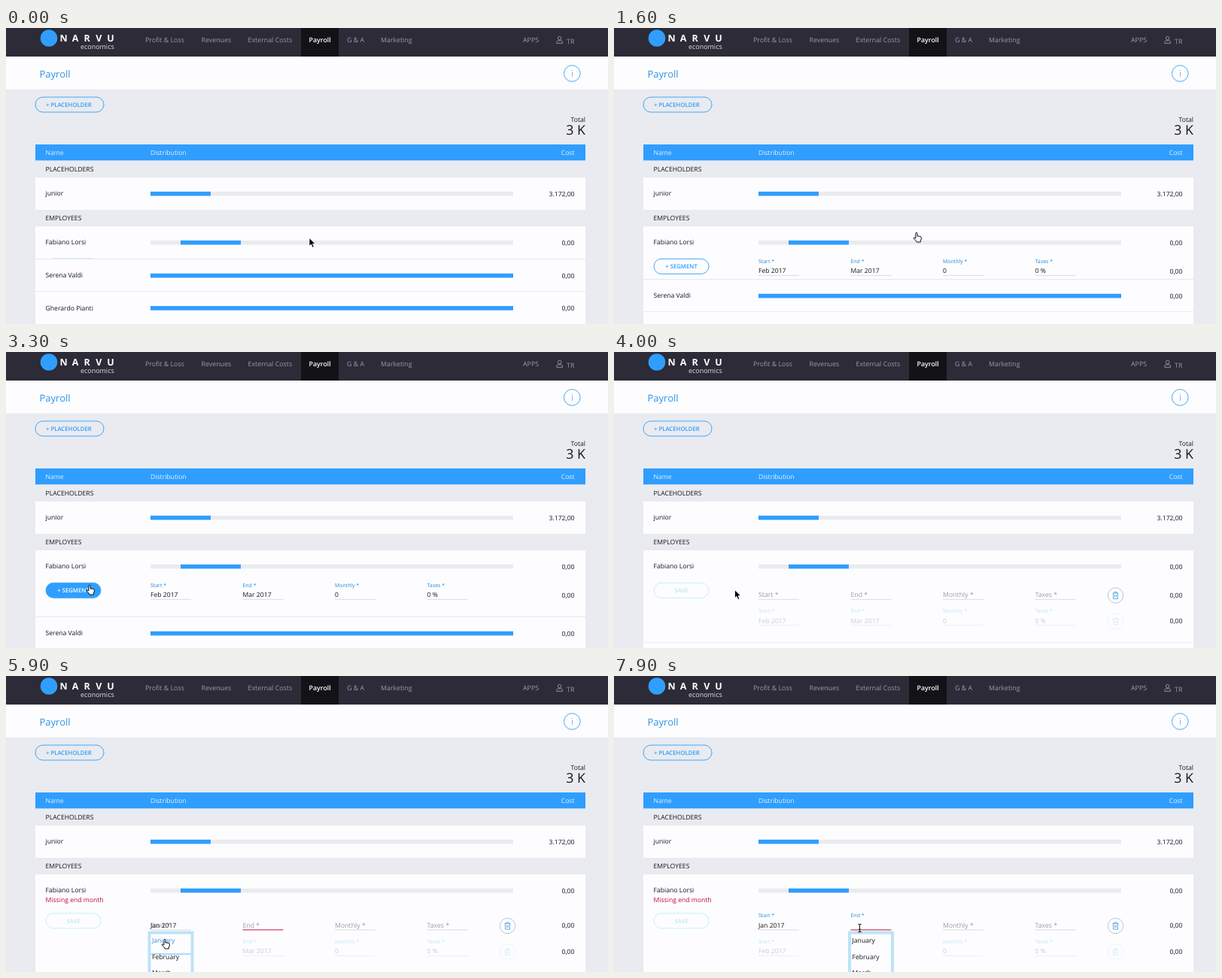
An HTML page that plays this animation: 800x394 px, repeating every 8 s.

```html
<!DOCTYPE html>
<html lang="en">
<head>
<meta charset="utf-8">
<title>Payroll</title>
<style>
  html, body { margin: 0; width: 100%; height: 100%; overflow: hidden; background: #e9ebf0; }
  svg { display: block; width: 800px; height: 394px; }
  text { font: 8.65px "Open Sans", "Noto Sans", sans-serif; fill: #17171b; text-rendering: geometricPrecision; white-space: pre; }
  .nav { font-size: 8.85px; fill: #9b9ba5; }
  .on { font-weight: 600; fill: #fff; }
  .head { fill: #e6f3ff; }
  .btn { font-size: 7.75px; font-weight: 600; fill: #2e9cfb; }
  .small { font-size: 6.95px; fill: #2687dc; }
  .hint { font-size: 8.75px; fill: #9a9da5; }
  .err { fill: #c00b3c; }
  .dim .small { fill: #c3e3f7; }
  .dim .val { fill: #c9ccd2; }
  .dim .rule { stroke: #eceef2; }
  .rule { stroke: #d9dbe1; }
  .end { text-anchor: end; }
  .mid { text-anchor: middle; }
</style>
</head>
<body>
<svg id="stage" viewBox="0 0 800 394"></svg>
<script>
const BLUE = '#2f9eff', WHITE = '#fdfdff', LINE = '#e5e7ec', RED = '#c3123f';
const COLS = [192, 314.5, 437, 559.5];
const LABELS = ['Start *', 'End *', 'Monthly *', 'Taxes *'];
const SEG = 34.5, ERR = 8.6, OPEN = 45;

const text = (x, y, s, cls = '', more = '') => `<text x="${x}" y="${y}" class="${cls}" ${more}>${s}</text>`;
const rect = (x, y, w, h, fill, more = '') => `<rect x="${x}" y="${y}" width="${w}" height="${h}" fill="${fill}" ${more}/>`;
const line = (x, y, w, more = '') => `<path d="M${x} ${y}h${w}" ${more}/>`;
const group = (id, body, more = '') => `<g id="${id}" ${more}>${body}</g>`;
const pill = (x, y, w, color, fill = 'none') =>
  rect(x, y, w, 20, fill, `rx="10" stroke="${color}"`);

// One table row: name, bar from a to b, cost.
const row = (y, name, a, b, cost) =>
  rect(39, y, 731, 43, WHITE) +
  text(52.5, y + 24.3, name) +
  rect(192, y + 18.8, 482, 5.6, '#e9ebef') +
  rect(a, y + 18.8, b - a, 5.6, BLUE) +
  text(755.5, y + 24.5, cost, 'end');

const trash = (x, y) => `<g transform="translate(${x} ${y})" fill="none">
  <circle r="10.2" stroke="#b4c6d3"/>
  <path d="M-4 -3h8M-1.5 -3v-1.6h3V-3M-3 -3v7.5h6V-3M-1 -1v3.6M1 -1v3.6" stroke="#3a9ee0" stroke-width=".8"/></g>`;

const oldFields = () => ['Feb 2017', 'Mar 2017', '0', '0 %'].map((v, i) =>
  text(COLS[i], 312.5, LABELS[i], 'small') +
  text(COLS[i], 326, v, 'val') +
  line(COLS[i], 329.3, 54, 'class="rule"')).join('');

const newFields = () => LABELS.map((s, i) =>
  text(0, 0, s, 'hint', `id="label${i}" transform="translate(${COLS[i]} 326)"`) +
  line(COLS[i], 329.3, 54, `class="rule" id="rule${i}"`)).join('');

const menu = () =>
  rect(-1.5, 0, 57, 90, WHITE, 'stroke="#bde3f7" stroke-width="4"') +
  line(.5, 28.5, 53, 'id="pick" stroke="#9ed6f7" stroke-width="1.6"') +
  ['January', 'February', 'March'].map((m, i) =>
    text(2, 13.6 + i * 21.4, m, '', `id="month${i}"`)).join('');

const header =
  rect(0, 0, 800, 38, '#2c2b37') + rect(392, 0, 50, 38, '#121217') +
  `<circle cx="57" cy="13.5" r="11.3" fill="${BLUE}"/>` +
  [...'NARVU'].map((c, i) => text(76.5 + i * 15.6, 17.6, c, 'on mid', 'style="font-size:12.5px;font-weight:700"')).join('') +
  text(99, 28, 'economics', '', 'style="font-size:8.95px;fill:#e2e2e7"') +
  [[185, 'Profit &amp; Loss'], [259.5, 'Revenues'], [321.5, 'External Costs'], [453, 'G &amp; A'],
   [498, 'Marketing'], [687, 'APPS']].map(([x, s]) => text(x, 19.4, s, 'nav')).join('') +
  text(402.5, 19.4, 'Payroll', 'nav on') + text(745, 20.6, 'TR', 'nav') +
  `<g fill="none" stroke="#9b9ba5" stroke-width=".9"><circle cx="735.7" cy="13.6" r="2.3"/>
   <path d="M731.8 20.3v-1.2q0-2 2-2.4h3.8q2 .4 2 2.4v1.2z"/></g>`;

const page =
  rect(0, 38, 800, 43.5, WHITE) +
  text(44.5, 65.6, 'Payroll', '', 'style="font-size:13px;fill:#2f93e6"') +
  `<circle cx="752.3" cy="60.5" r="10.8" fill="none" stroke="#4ba6ec"/>` +
  text(752.3, 65, 'i', 'mid', 'style="font-size:12.5px;font-weight:300;fill:#2f93e6"') +
  pill(39, 92, 91, '#44a6f5') + text(53, 104.8, '+ PLACEHOLDER', 'btn') +
  text(770, 125, 'Total', 'end') + text(770, 141.6, '3 K', 'end', 'style="font-size:17.8px"') +
  rect(39, 155, 731, 21.3, BLUE) +
  text(52.5, 168.6, 'Name', 'head') + text(192, 168.6, 'Distribution', 'head') +
  text(755.5, 168.6, 'Cost', 'head end') +
  text(52.5, 191.2, 'PLACEHOLDERS') + text(52.5, 256.2, 'EMPLOYEES') +
  row(199, 'junior', 192, 272, '3.172,00') +
  rect(39, 264, 731, 130, WHITE) +
  row(264, 'Fabiano Lorsi', 232, 312, '0,00');

const details =
  group('add', `<rect id="addBox" x="53" y="307.3" width="73" height="20" rx="10" stroke="#44a6f5"/>` +
    text(89.5, 320.2, '+ SEGMENT', 'btn mid', 'id="addText"')) +
  group('save', pill(53, 307.3, 73, '#c8f0e6') + text(89.5, 320.2, 'SAVE', 'btn mid', 'style="fill:#bcebdf"')) +
  group('old', oldFields() + text(755.5, 326.6, '0,00', 'end') + group('oldBin', trash(666.5, 324), 'opacity=".2"')) +
  group('fresh', newFields() + text(192, 326, 'Jan 2017', '', 'id="value"') +
    text(755.5, 326.6, '0,00', 'end') + trash(666.5, 324));

const below =
  rect(39, 307, 731, 120, WHITE) + rect(39, 307, 731, 1, LINE) +
  row(308, 'Serena Valdi', 192, 674, '0,00') + rect(39, 350.3, 731, 1, LINE) +
  row(351.3, 'Gherardo Pianti', 192, 674, '0,00');

const cursors = group('cursor',
  `<path id="arrow" d="M0 0v10.8l2.5-2.3 1.8 4.2 2-.9-1.8-4h3.4z" fill="#000" stroke="#fff" stroke-width=".8"/>
   <path id="hand" transform="translate(-4.3 0)" d="M3.2 8V1.6q0-1.2 1.1-1.2t1.1 1.2V5.2q1-.8 1.9.1 1-.5 1.7.3 1.5-.3 1.6 1V9l-1 2.2V13H4.6L3 10.5 .6 8.2q-.5-1.2.8-1.3z" fill="#fff" stroke="#000" stroke-width=".95"/>
   <path id="beam" d="M-2.3 -5.3q2.3 0 2.3 1.3q0-1.3 2.3-1.3M0 -4V4M-2.3 5.3q2.3 0 2.3-1.3q0 1.3 2.3 1.3M-1.3 1.5h2.6" fill="none" stroke="#222" stroke-width="1.1"/>`);

const stage = document.getElementById('stage');
stage.innerHTML = page + group('details', details) + text(52.5, 301.2, 'Missing end month', 'err', 'id="error"') +
  group('below', below) + header + rect(0, 0, 1, 11, '#17171b', 'id="caret"') + group('menu', menu()) + cursors;

const el = {};
stage.querySelectorAll('[id]').forEach(n => el[n.id] = n);

const ramp = (t, a, b) => Math.min(1, Math.max(0, (t - a) / (b - a)));
const ease = u => u * u * (3 - 2 * u);
const show = (n, on) => n.setAttribute('visibility', on ? 'inherit' : 'hidden');
const move = (n, x, y) => n.setAttribute('transform', `translate(${x} ${y})`);
const within = (t, a, b) => t >= a && t < b;

// Cursor stops: time, x, y.
const PATH = [[0, 403, 279.5], [800, 403, 279.5], [1200, 402, 272], [1900, 402, 272], [2800, 111, 310],
  [3700, 111, 310], [4300, 210, 323.5], [4900, 210, 323.5], [5400, 211, 342], [5700, 211, 350],
  [6100, 211, 350], [6500, 244, 344], [7100, 326.5, 335.5], [8000, 326.5, 335.5]];
const SHAPES = [[0, 'arrow'], [1000, 'hand'], [3700, 'arrow'], [4100, 'beam'], [5200, 'hand'], [7000, 'beam']];

function cursorAt(t) {
  const i = PATH.findIndex(p => p[0] > t), a = PATH[i - 1], b = PATH[i];
  const u = ease(ramp(t, a[0], b[0]));
  move(el.cursor, a[1] + (b[1] - a[1]) * u, a[2] + (b[2] - a[2]) * u);
  const shape = SHAPES.filter(s => s[0] <= t).pop()[1];
  for (const s of ['arrow', 'hand', 'beam']) show(el[s], s === shape);
}

// u = 0: hint inside the field; u = 1: small label above it.
function floatLabel(i, u) {
  const n = el['label' + i], mix = (a, b) => Math.round(a + (b - a) * u);
  n.setAttribute('transform', `translate(${COLS[i]} ${326 - 13.5 * u}) scale(${1 - .206 * u})`);
  n.style.fill = `rgb(${mix(154, 38)},${mix(157, 135)},${mix(165, 220)})`;
}

function draw(t) {
  const open = ramp(t, 1450, 1700), added = ease(ramp(t, 3400, 3600));
  const error = ease(ramp(t, 5600, 5800)), shift = ERR * error;
  const split = t >= 3500;

  move(el.below, 0, OPEN * open + SEG * added + shift);
  move(el.details, 0, shift);
  move(el.old, 0, SEG * added);
  el.old.setAttribute('class', split ? 'dim' : '');
  for (const k of ['oldBin', 'fresh', 'save']) show(el[k], split);
  show(el.add, !split);
  const hover = t >= 2700;
  el.addBox.setAttribute('fill', hover ? BLUE : 'none');
  el.addText.style.fill = hover ? '#fff' : '';

  floatLabel(0, ease(t < 5700 ? ramp(t, 4500, 4700) : t < 5900 ? 1 - ramp(t, 5700, 5900) : ramp(t, 5900, 6200)));
  floatLabel(1, ease(ramp(t, 7200, 7500)));
  show(el.value, t >= 5800);
  el.error.setAttribute('opacity', error);
  el.rule1.style.stroke = t >= 5700 ? RED : '';

  const first = within(t, 4600, 6200), second = t >= 7300;
  const since = second ? t - 7300 : t - 4600;
  show(el.menu, first || second);
  move(el.menu, COLS[second ? 1 : 0], 333 + shift - 6 * (1 - ramp(since, 0, 200)));
  el.menu.setAttribute('opacity', first && t > 5900 ? 1 - ramp(t, 5900, 6200) : ramp(since, -100, 100));
  const picking = first && t >= 5300;
  show(el.pick, picking);
  el.month0.style.fill = picking ? '#2f93e6' : '';

  show(el.caret, (within(t, 4600, 5700) || second) && since % 1000 < 500);
  move(el.caret, second ? 314.5 : 192, 317.5 + shift);
  cursorAt(t);
}

const start = performance.now();
function tick() {
  draw(Math.floor((performance.now() - start) % 8000 / 100) * 100);
  requestAnimationFrame(tick);
}
tick();
</script>
</body>
</html>
```
